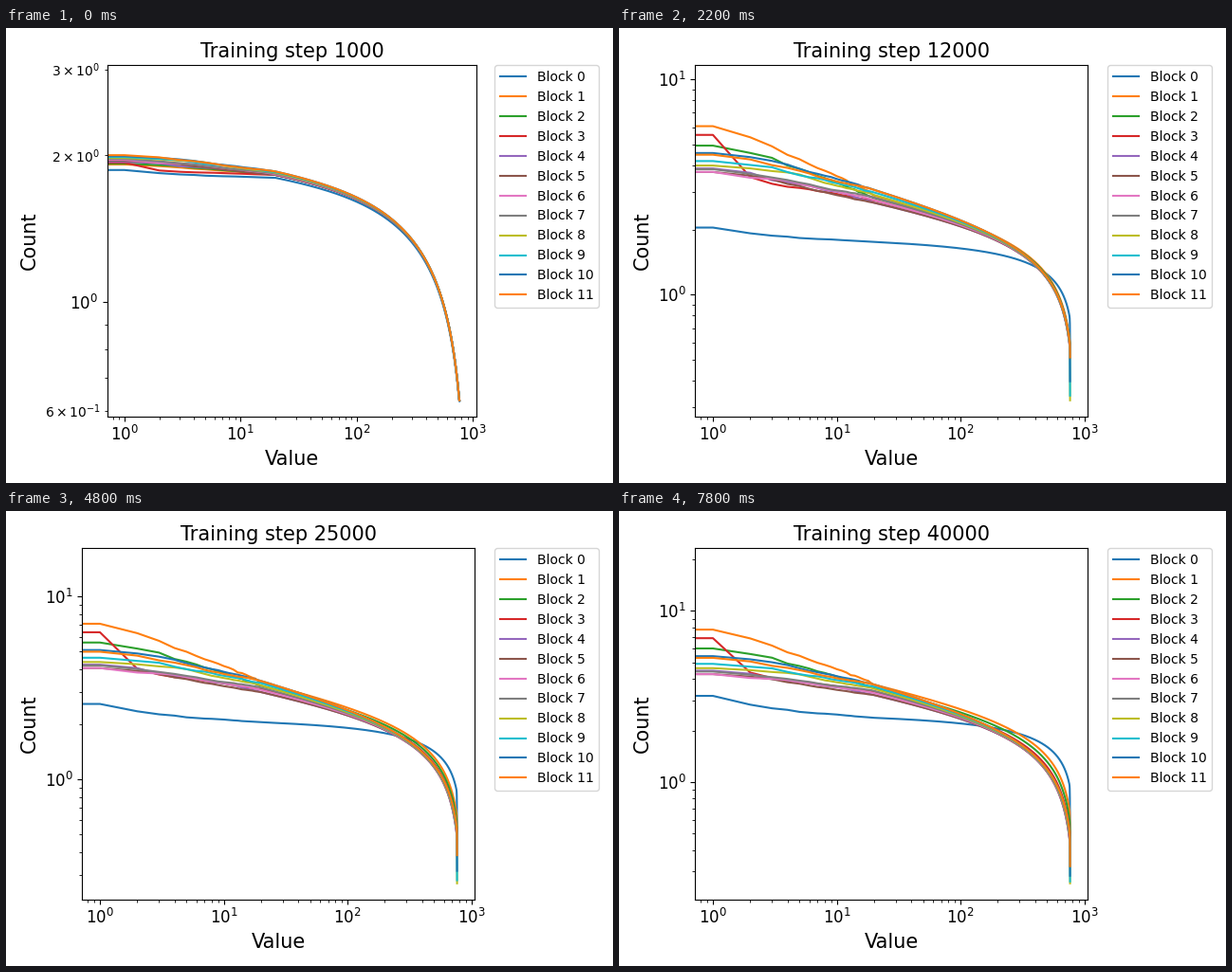
A matplotlib script that plays this animation: 640 px wide and 480 px high, repeating every 8000 ms.

```python
import numpy as np
import matplotlib.pyplot as plt
from matplotlib.animation import FuncAnimation

FRAMES = 40
BLOCKS = 12
LAST = 767
N = np.arange(1, LAST + 1)
X = np.r_[0.5, N]
TURN = 0.53  # share of (log) training time after which the bundle spreads

# log10 of the y limits at a few training steps (in thousands)
KEY_STEPS = [1, 7, 12, 16, 25, 31, 40]
Y_TOP = [0.4855, 1.028, 1.066, 1.147, 1.264, 1.318, 1.365]
Y_BOTTOM = [-0.2335, -0.468, -0.565, -0.615, -0.658, -0.666, -0.685]

# Final log10 height of blocks 1 to 11 at rank 1
FINAL_HEAD = [0.89, 0.78, 0.84, 0.65, 0.63, 0.63, 0.645, 0.665, 0.69, 0.735, 0.725]

# How evenly a curve descends from rank 1 to rank 20; below 1 is steep at first
DROP_POWER = {0: 0.65, 3: 0.5}


def mix(a, b, w):
    return a + (b - a) * w


def y_limits(step):
    return [np.interp(np.log(step), np.log(KEY_STEPS), row)
            for row in (Y_BOTTOM, Y_TOP)]


def drop_curve(block):
    """Uneven stairs from 0 at rank 1 to 1 at rank 20."""
    rng = np.random.default_rng(block)
    even = (np.log(N[:20]) / np.log(20)) ** DROP_POWER.get(block, 1.3)
    stairs = np.cumsum(np.diff(even) * rng.gamma(9, 1 / 9, 19))
    return np.r_[0, stairs / stairs[-1]]


DROPS = [drop_curve(b) for b in range(BLOCKS)]


def bulk(at20, at100, power, cutoff):
    """Power law with a bent tail, passing through ranks 20 and 100."""
    def tail(n):
        return power * np.log10(1 - (n / cutoff) ** 0.8)
    slope = (at100 - at20 - tail(100) + tail(20)) / np.log10(5)
    return at100 + slope * np.log10(N / 100) + tail(N) - tail(100)


def first_block(s, young, mature):
    def bowl(start, dip, rise):
        return start - dip * s + rise * s ** 2.5
    return (bowl(0.271, 0.151, 0.383), bowl(0.255, 0.18, 0.3),
            bowl(0.206, 0.138, 0.274), 0.26 + 0.2 * young + 0.06 * mature)


def later_block(block, s, young, mature):
    """Levels at ranks 1, 20 and 100 and the tail power."""
    spread = mature ** 0.5
    if block < 5:
        w20 = w100 = (4 - block) / 3 * spread
    else:
        w20 = min((block - 5) / 5, 1)
        w100 = w20 * (1 - 0.5 * spread)
    head = mix(0.2805 + 0.0019 * block, FINAL_HEAD[block - 1], s ** 0.49)
    at20 = mix(mix(0.261, 0.508, s), mix(0.268, 0.569, s ** 0.8), w20)
    at100 = mix(mix(0.211, 0.369, s), mix(0.215, 0.425, s), w100)
    power = 0.36 + 0.1 * young + mix(0.17, 0.05, w100) * mature
    return head, at20, at100, power


def curve(block, step):
    s = np.log(step) / np.log(FRAMES)
    young = max(0, 1 - s / TURN)
    mature = max(0, (s - TURN) / (1 - TURN))
    if block == 0:
        head, at20, at100, power = first_block(s, young, mature)
    else:
        head, at20, at100, power = later_block(block, s, young, mature)
    y = bulk(at20, at100, power, 830 + 70 * young)
    y[:20] = mix(head, y[19], DROPS[block])

    # The last few values fall towards the floor of the plot
    lo, hi = y_limits(step)
    lift = ((block - 8) / 3) ** 2 if block >= 8 else 1
    end = lo + (hi - lo) / 22 + lift * s * (0.7 - 0.6 * s)
    y = mix(y, end, np.exp((N - LAST) / 1.5))
    y = np.minimum.accumulate(y)
    return 10 ** np.r_[y[0], y]


fig, ax = plt.subplots(figsize=(6.4, 4.8), dpi=100)
lines = [ax.plot(X, np.ones_like(X), label=f"Block {b}")[0]
         for b in range(BLOCKS)]
ax.set_xscale("log")
ax.set_yscale("log")
ax.set_xlim(LAST ** -0.05, LAST ** 1.05)
ax.set_xlabel("Value", fontsize=15)
ax.set_ylabel("Count", fontsize=15)
ax.tick_params(labelsize=12)
ax.legend(bbox_to_anchor=(1.05, 1), loc="upper left", borderaxespad=0)


def set_view(step):
    lo, hi = y_limits(step)
    ax.set_ylim(10 ** lo, 10 ** hi)
    ax.set_title(f"Training step {step * 1000}", fontsize=15)
    return bool(hi - lo < 1)


def fit_margins(step):
    set_view(step)
    for _ in range(4):
        fig.tight_layout()
    p = fig.subplotpars
    return dict(left=p.left, right=p.right, bottom=p.bottom, top=p.top)


# Less than a decade on the y axis brings wide minor labels
margins = {True: fit_margins(1), False: fit_margins(FRAMES)}


def update(i):
    step = i + 1
    fig.subplots_adjust(**margins[set_view(step)])
    for b, line in enumerate(lines):
        line.set_ydata(curve(b, step))
    return lines


anim = FuncAnimation(fig, update, frames=FRAMES, interval=200, repeat=True)
plt.show()
```
